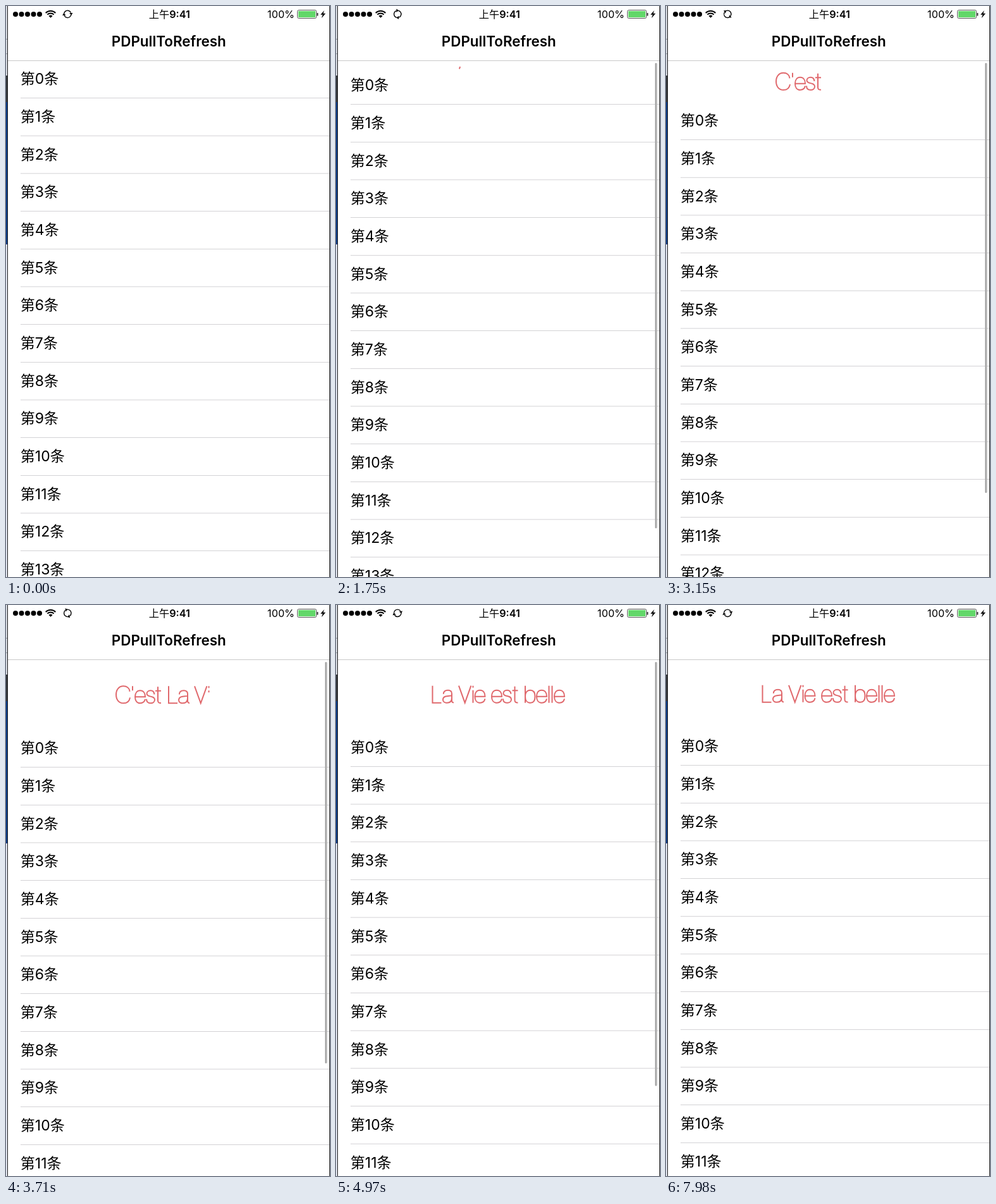
These frames come from a looping animation (512 by 903 pixels, 8000 ms). An HTML page with a canvas:

```html
<!DOCTYPE html>
<html lang="zh">
<head>
<meta charset="utf-8">
<title>PDPullToRefresh</title>
<style>
html, body { margin: 0; width: 100%; height: 100%; overflow: hidden; background: #fff; }
canvas { display: block; width: 512px; height: 903px; }
</style>
</head>
<body>
<canvas id="stage" width="512" height="903" role="img" aria-label="C'est La Vie / La Vie est belle"></canvas>
<script>
const ctx = document.getElementById('stage').getContext('2d');
const LOOP = 8000, STEP = 70;
const FONT = 'Inter, "Noto Sans CJK SC", "Noto Sans CJK", sans-serif';
const HEAD = 86, ROW = 59.68, HAIR = 0.7;
const RELEASE = 4480, PEAK = 153, REST = 108;

// Time, pull distance, speed while the finger drags.
const drag = [
  [1250, 0, 0], [1750, 10, 0.032], [3150, 66, 0.055],
  [4340, 152, 0.02], [RELEASE, PEAK, 0]
];

// Single-line letters on a baseline: approximate pen length, path.
const e = [66, 'M0-10H16C16-16 13-20 8-20C3-20 0-16 0-10C0-4 3 0 8 0C12 0 15-2 16-6.5'];
const pen = {
  C: [70, 'M22-9C21-3 17 0 11.5 0C4.5 0 0-5.5 0-13.5C0-21.5 4.5-27 11.5-27C17-27 21-24 21.5-18.5'],
  "'": [7, 'M0-27V-20'],
  e,
  s: [52, 'M12.5-14C12-18 10-20 6.5-20C3-20 .5-18 .5-15C.5-8.5 13-13 13-5.5C13-2 10 0 6.5 0C2.5 0 0-2 0-6.5'],
  t: [28, 'M4-26V-4Q4 0 9-.3M0-19.5H9'],
  L: [41, 'M0-27V0H14'],
  a: [75, 'M.8-14C1-18 3.5-20 8-20C12-20 14-18 14-14.5V-4Q14 0 17-.5M14-12C13-10 0-13 0-5C0-2 2.5 0 6 0C11 0 14-3 14-8'],
  V: [58, 'M0-27L9.7 0L19.4-27'],
  i: [23, 'M0-20V0M0-27V-24'],
  b: [80, 'M0-27V0M0-10C0-16 3-20 8-20C13-20 15.5-16 15.5-10C15.5-4 13 0 8 0C3 0 0-4 0-10'],
  l: [27, 'M0-27V0']
};
for (const k in pen) pen[k] = { length: pen[k][0], path: new Path2D(pen[k][1]) };

const pullText = { letters: "C'estLaVie", xs: [174, 200, 204, 222, 236, 257, 273, 298, 320.5, 324] };
const loadText = { letters: 'LaVieestbelle', xs: [152.5, 169, 194, 216.5, 219.5, 246, 264, 278.5, 299, 317, 336.5, 341.5, 345] };

const clamp = v => Math.max(0, Math.min(1, v));

// Share of the bounce still left after release.
function bounce(t) {
  const k = (t - RELEASE) * 0.0102;
  return (1 + k) * Math.exp(-k);
}

function pullAt(t) {
  if (t <= drag[0][0]) return 0;
  if (t >= RELEASE) return REST + (PEAK - REST) * bounce(t);
  const n = drag.findIndex(k => k[0] > t);
  const [t0, a, va] = drag[n - 1], [t1, b, vb] = drag[n];
  const d = t1 - t0, u = (t - t0) / d, w = 1 - u;
  return a * w * w * (1 + 2 * u) + va * d * u * w * w
    + b * u * u * (3 - 2 * u) - vb * d * u * u * w;
}

function rect(x, y, w, h, color) {
  ctx.fillStyle = color;
  ctx.fillRect(x, y, w, h);
}

function text(str, x, y, size, weight = 400, align = 'left') {
  ctx.font = `${weight} ${size}px ${FONT}`;
  ctx.textAlign = align;
  ctx.fillStyle = '#000';
  ctx.fillText(str, x, y);
}

function drawList(pull) {
  for (let i = 0; i < 14; i++) {
    const y = HEAD + pull + i * ROW;
    text(`第${i}条`, 22.8, y + 37.3, 23);
    rect(23, y + ROW - 0.5, 488, HAIR, '#c0bfc3');
  }
}

function drawWords({ letters, xs }, middle, progress) {
  const total = [...letters].reduce((sum, c) => sum + pen[c].length, 0);
  let left = progress * total;
  ctx.save();
  ctx.strokeStyle = '#e0696d';
  ctx.lineWidth = 2;
  xs.forEach((x, i) => {
    const { length, path } = pen[letters[i]];
    if (left > 0.6) {
      ctx.save();
      ctx.translate(x, middle + 13.3);
      if (left < length) ctx.setLineDash([left, 999]);
      ctx.stroke(path);
      ctx.restore();
    }
    left -= length;
  });
  ctx.restore();
}

function drawScrollbar(t, pull) {
  if (t <= drag[0][0]) return;
  const end = t < RELEASE ? 836 - pull : 764 - 81 * bounce(t);
  ctx.globalAlpha = 1 - clamp((t - 5450) / 300);
  ctx.fillStyle = '#aeaeae';
  ctx.beginPath();
  ctx.roundRect(504, 90, 3.3, end - 90, 1.6);
  ctx.fill();
  ctx.globalAlpha = 1;
}

function drawWifi() {
  ctx.strokeStyle = ctx.fillStyle = '#000';
  ctx.lineWidth = 2;
  for (const r of [11, 7.3]) {
    ctx.beginPath();
    ctx.arc(70.5, 18.8, r, -Math.PI * 0.75, -Math.PI * 0.25);
    ctx.stroke();
  }
  ctx.beginPath();
  ctx.moveTo(70.5, 18.8);
  ctx.arc(70.5, 18.8, 4.3, -Math.PI * 0.75, -Math.PI * 0.25);
  ctx.fill();
}

function drawSync(t) {
  ctx.save();
  ctx.translate(97.3, 12.8);
  ctx.rotate(t / 1000 * Math.PI * 2);
  ctx.strokeStyle = ctx.fillStyle = '#000';
  ctx.lineWidth = 1.4;
  for (let i = 0; i < 2; i++) {
    ctx.beginPath();
    ctx.arc(0, 0, 5.7, -Math.PI * 0.94, -Math.PI * 0.13);
    ctx.stroke();
    ctx.beginPath();
    ctx.moveTo(2.8, -1.9);
    ctx.lineTo(8.2, -1.9);
    ctx.lineTo(5.9, 1.7);
    ctx.fill();
    ctx.rotate(Math.PI);
  }
  ctx.restore();
}

function drawBattery() {
  ctx.strokeStyle = '#555';
  ctx.lineWidth = 1;
  ctx.beginPath();
  ctx.roundRect(460.5, 6.5, 30, 13, 2.2);
  ctx.stroke();
  rect(462, 8, 27, 10, '#62d769');
  rect(491.5, 11, 1.7, 4.5, '#222');
  ctx.fillStyle = '#000';
  ctx.fill(new Path2D('M502.8 7L497 13.8H500.4L498.6 19.2L505 11.8H501.3Z'));
}

function drawHeader(t) {
  rect(0, 0, 512, HEAD, '#fff');
  rect(3, HEAD, 508, HAIR, '#b2b2b2');
  ctx.fillStyle = '#000';
  for (let i = 0; i < 5; i++) {
    ctx.beginPath();
    ctx.arc(15 + i * 9.5, 13, 4, 0, Math.PI * 2);
    ctx.fill();
  }
  drawWifi();
  drawSync(t);
  text('上午', 225.8, 18.8, 16.2);
  text('9:41', 258.2, 18.8, 16.2, 600);
  text('100%', 456, 18.8, 16.2, 400, 'right');
  drawBattery();
  text('PDPullToRefresh', 257.3, 64, 22.4, 600, 'center');
}

function drawEdges() {
  rect(0, 0, 2, 110, '#d5d9e0');
  rect(0, 52, 2, 1, '#8e949c');
  rect(0, 75, 2, 1, '#8e949c');
  rect(0, 110, 2, 42, '#33363b');
  rect(0, 152, 2, 225, '#0b3a85');
  rect(0, 377, 2, 526, '#dfe3ee');
  rect(2, 0, 1, 903, '#1c1c1c');
  rect(511, 0, 1, 903, '#1c1c1c');
}

function draw(t) {
  const pull = pullAt(t), middle = HEAD + 0.5 + pull / 2;
  rect(0, 0, 512, 903, '#fff');
  drawList(pull);
  if (t < RELEASE) drawWords(pullText, middle, clamp((pull - 9) / 124));
  else drawWords(loadText, middle, 1);
  drawScrollbar(t, pull);
  drawHeader(t);
  drawEdges();
}

const start = performance.now();
function tick() {
  const t = (performance.now() - start) % LOOP;
  draw(Math.floor(t / STEP) * STEP);
  requestAnimationFrame(tick);
}
tick();
</script>
</body>
</html>
```
